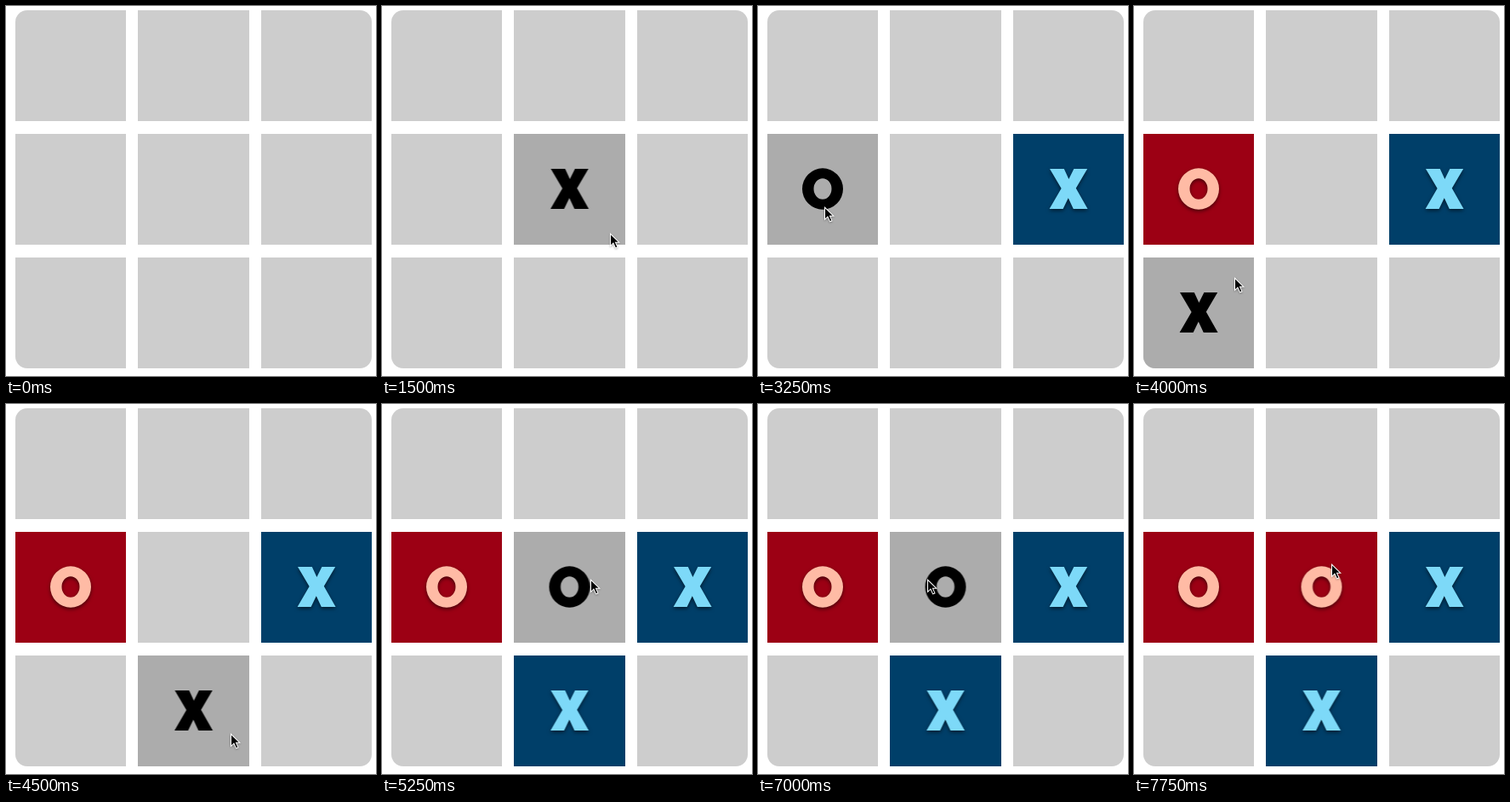
An HTML page without scripts that plays this animation: 435 px wide and 434 px high, repeating every 8000 ms.

```html
<!DOCTYPE html>
<html lang="en">
<head>
<meta charset="utf-8">
<title>Noughts and crosses</title>
<style>
  html, body { margin: 0; width: 100%; height: 100%; overflow: hidden; background: #fff; }
  svg { display: block; width: 100%; height: 100%; }

  .tile { --bg: #acacac; --ink: #000; }
  .blue { --bg: #003f69; --ink: #7dd9f8; --shade: drop-shadow(0 2px 2px rgba(0, 0, 0, .55)); }
  .red  { --bg: #9c0014; --ink: #ffbba5; --shade: drop-shadow(0 2px 2px rgba(0, 0, 0, .55)); }
  .bg   { fill: var(--bg); }
  .mark { fill: var(--ink); filter: var(--shade, none); }

  .tile, #cursor { opacity: 0; animation: 8s step-end infinite; }

  /* Hovered cells */
  #x-mid   { animation-name: x-mid; }
  #x-right { animation-name: x-right; }
  #o-mid   { animation-name: o-mid; }
  #o-left  { animation-name: o-left; }
  #x-low   { animation-name: x-low; }
  #x-base  { animation-name: x-base; }
  #o-top   { animation-name: o-top; }
  #o-far   { animation-name: o-far; }
  @keyframes x-mid   { 0%, 21.875% { opacity: 0 } 18.75% { opacity: 1 } }
  @keyframes x-right { 0%, 28.125% { opacity: 0 } 21.875% { opacity: 1 } }
  @keyframes o-mid   { 0%, 37.5%, 68.75%, 93.75% { opacity: 0 } 34.375%, 65.625%, 87.5% { opacity: 1 } }
  @keyframes o-left  { 0%, 46.875% { opacity: 0 } 37.5% { opacity: 1 } }
  @keyframes x-low   { 0%, 53.125% { opacity: 0 } 50% { opacity: 1 } }
  @keyframes x-base  { 0%, 62.5% { opacity: 0 } 53.125% { opacity: 1 } }
  @keyframes o-top   { 0%, 78.125% { opacity: 0 } 68.75% { opacity: 1 } }
  @keyframes o-far   { 0%, 84.375% { opacity: 0 } 81.25% { opacity: 1 } }

  /* Claimed cells stay until the loop ends */
  #take1 { animation-name: take1; }
  #take2 { animation-name: take2; }
  #take3 { animation-name: take3; }
  #take4 { animation-name: take4; }
  @keyframes take1 { 0% { opacity: 0 } 28.125%, 100% { opacity: 1 } }
  @keyframes take2 { 0% { opacity: 0 } 46.875%, 100% { opacity: 1 } }
  @keyframes take3 { 0% { opacity: 0 } 62.5%, 100% { opacity: 1 } }
  @keyframes take4 { 0% { opacity: 0 } 93.75%, 100% { opacity: 1 } }

  #cursor { animation-name: show, move; filter: drop-shadow(0 1px 1px rgba(0, 0, 0, .3)); }
  @keyframes show { 0%, 12.5% { opacity: 0 } 9.375%, 18.75%, 100% { opacity: 1 } }
  @keyframes move {
    0%      { transform: translate(311px, 247px) }
    18.75%  { transform: translate(268px, 266px) }
    21.875% { transform: translate(313px, 226px) }
    34.375% { transform: translate(228px, 229px) }
    37.5%   { transform: translate(108px, 233px) }
    40.625% { transform: translate(78px, 235px) }
    43.75%  { transform: translate(79px, 241px) }
    50%     { transform: translate(118px, 318px) }
    53.125% { transform: translate(232px, 380px) }
    56.25%  { transform: translate(264px, 386px) }
    59.375% { transform: translate(262px, 387px) }
    65.625% { transform: translate(245px, 205px) }
    68.75%  { transform: translate(236px, 92px) }
    71.875% { transform: translate(238px, 104px) }
    75%     { transform: translate(240px, 109px) }
    78.125% { transform: translate(236px, 362px) }
    81.25%  { transform: translate(356px, 96px) }
    84.375% { transform: translate(45px, 212px) }
    87.5%   { transform: translate(199px, 205px) }
    90.625% { transform: translate(198px, 208px) }
    96.875%, 100% { transform: translate(232px, 187px) }
  }
</style>
</head>
<body>
<svg viewBox="0 0 435 434" role="img" aria-label="A game of X and O on a three by three board">
  <defs>
    <clipPath id="round"><rect x="11" y="5" width="419" height="420" rx="14"/></clipPath>
    <rect id="cell" class="bg" x="-1" width="133" height="130"/>
    <g id="x">
      <use href="#cell"/>
      <path class="mark" transform="translate(65 64.5)"
        d="M-22-23.5H-5.2L.4-11.5L6.4-23.5H22.2L8.8-.8L22.6 23.5H5.8L-.2 10.8L-6.4 23.5H-22.4L-8.4-.5Z"/>
    </g>
    <g id="o">
      <use href="#cell"/>
      <path class="mark" fill-rule="evenodd" transform="translate(65 64.5)"
        d="M-24 0A24 24.2 0 0 1 24 0A24 24.2 0 0 1-24 0ZM-10.5 0A10.5 12.2 0 0 0 10.5 0A10.5 12.2 0 0 0-10.5 0Z"/>
    </g>
  </defs>

  <g clip-path="url(#round)">
    <rect x="11" y="5" width="419" height="420" fill="#cdcdcd"/>

    <use id="x-mid" class="tile" href="#x" x="155.5" y="150"/>
    <use id="x-right" class="tile" href="#x" x="300" y="150"/>
    <use id="o-mid" class="tile" href="#o" x="155.5" y="150"/>
    <use id="o-left" class="tile" href="#o" x="11" y="150"/>
    <use id="x-low" class="tile" href="#x" x="11" y="295"/>
    <use id="x-base" class="tile" href="#x" x="155.5" y="295"/>
    <use id="o-top" class="tile" href="#o" x="155.5" y="5"/>
    <use id="o-far" class="tile" href="#o" x="300" y="5"/>

    <use id="take1" class="tile blue" href="#x" x="300" y="150"/>
    <use id="take2" class="tile red" href="#o" x="11" y="150"/>
    <use id="take3" class="tile blue" href="#x" x="155.5" y="295"/>
    <use id="take4" class="tile red" href="#o" x="155.5" y="150"/>
  </g>

  <!-- Gaps between cells -->
  <path fill="#fff" d="M141 0h14v434h-14zM286 0h14v434h-14zM0 135h435v15H0zM0 280h435v15H0z"/>

  <g id="cursor">
    <path fill="#fff" d="M0 0V16.6L3.8 13L6.3 18.6L9.6 17.2L7.2 11.8H12Z"/>
    <path d="M1 2.4V14.2L4.1 11.3L6.8 17.3L8.3 16.6L5.7 10.8H9.6Z"/>
  </g>
</svg>
</body>
</html>
```
